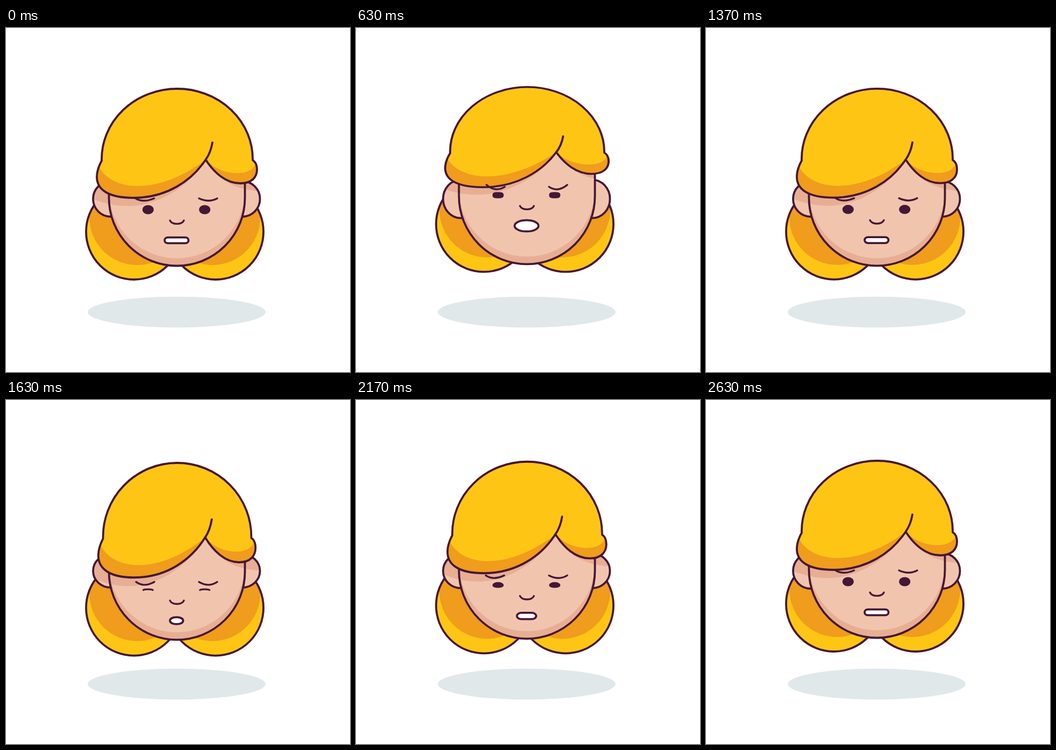
An HTML page for the animation above (4.81 s loop, 640x640 px).

```html
<!DOCTYPE html>
<html lang="en">
<head>
<meta charset="utf-8">
<title>Breathing girl</title>
<style>
  html, body { margin: 0; width: 100%; height: 100%; overflow: hidden; background: #fff; }
  svg { display: block; width: 100vw; height: 100vh; }
  .line { fill: none; stroke: #451736; stroke-width: 3.8; stroke-linecap: round; stroke-linejoin: round; vector-effect: non-scaling-stroke; }
  .thin { stroke-width: 3.4; }
  .hair { fill: #ffc515; }
  .dark { fill: #f09c1c; }
  .skin { fill: #f1c5ad; }
  .tint { fill: #e8ae93; }
  .eye { fill: #451736; stroke-width: 3; }
  .mouth { fill: #fff; }
</style>
</head>
<body>
<svg viewBox="0 0 640 640">
  <defs>
    <path id="face" d="M191.5 200V316A126.5 126.5 0 0 0 444.5 316V200Z"/>
    <ellipse id="earL" cx="195" cy="318" rx="33" ry="33"/>
    <ellipse id="earR" cx="439.5" cy="318" rx="33" ry="33"/>
    <circle id="bunL" cx="238" cy="379" r="89"/>
    <circle id="bunR" cx="390" cy="379" r="89"/>
    <path id="fringeShade" d="M150 230V312C180 329 212 332 235 331C290 328 345 290 372 245C395 284 425 303 485 304V230Z"/>
    <path id="hairShape" d="M178 247A140.5 131 0 0 1 318.5 113A140.5 131 0 0 1 459 246C463 248 467 254 467 263C467 277 458 289 436 289C409 289 387 269 371.5 245C345 285 298 316 237 316C191 316 169 301 169 277C169 265 173 256 178 247Z"/>
    <clipPath id="faceClip"><use href="#face"/></clipPath>
    <clipPath id="earClip"><use href="#earL"/><use href="#earR"/></clipPath>
    <clipPath id="bunLClip"><use href="#bunL"/></clipPath>
    <clipPath id="bunRClip"><use href="#bunR"/></clipPath>
    <clipPath id="hairClip"><use href="#hairShape"/></clipPath>
  </defs>

  <ellipse cx="317.5" cy="528.5" rx="165.5" ry="28.8" fill="#e1e8ea"/>

  <g id="buns">
    <use href="#bunL" class="hair"/>
    <use href="#bunR" class="hair"/>
    <g clip-path="url(#bunLClip)"><circle cx="244" cy="352" r="89" class="dark"/></g>
    <g clip-path="url(#bunRClip)"><circle cx="384" cy="352" r="89" class="dark"/></g>
    <use href="#bunL" class="line"/>
    <use href="#bunR" class="line"/>
  </g>

  <use href="#earL" class="skin"/>
  <use href="#earR" class="skin"/>
  <g clip-path="url(#earClip)"><use href="#fringeShade" class="tint follow"/></g>
  <use href="#earL" class="line"/>
  <use href="#earR" class="line"/>

  <use href="#face" class="tint"/>
  <g clip-path="url(#faceClip)">
    <use href="#face" y="-14" class="skin"/>
    <use href="#fringeShade" class="tint follow"/>
  </g>
  <use href="#face" class="line"/>

  <g class="follow">
    <use href="#hairShape" class="hair"/>
    <g clip-path="url(#hairClip)" class="dark">
      <path d="M160 240L172 256C184 281 212 294 245 294C290 294 336 272 371.5 245V330H160Z"/>
      <path d="M371.5 245C388 263 411 270 430 270C449 270 460 264 466 251H480V300H371.5Z"/>
    </g>
    <use href="#hairShape" class="line"/>
    <path class="line" d="M371.5 245C378 236 382 225 384 213"/>
  </g>

  <path id="browL" class="line thin"/>
  <path id="browR" class="line thin"/>
  <path id="eyeL" class="line eye"/>
  <path id="eyeR" class="line eye"/>
  <path id="nose" class="line thin" d="M305 358C309 366.5 327 366.5 331 358"/>
  <rect id="mouth" class="line mouth"/>
</svg>
<script>
const LOOP = 4810;
// time in ms and vertical travel of the features in px
const KEYS = [[0, 0], [915, -35], [1630, 14.3], [2630, 0], [LOOP, 0]];
const el = id => document.getElementById(id);
const followers = document.querySelectorAll(".follow");

function travel(t) {
  const i = KEYS.findIndex(k => t < k[0]);
  const [t0, a] = KEYS[i - 1], [t1, b] = KEYS[i];
  const p = (t - t0) / (t1 - t0);
  return a + (b - a) * p * p * (3 - 2 * p);
}

function set(id, attrs) {
  for (const name in attrs) el(id).setAttribute(name, attrs[name]);
}

function eyePath(x, y, top, bottom, k) {
  const w = 9, c = w * k;
  return `M${x - w} ${y}` +
    `C${x - w} ${y - top * k} ${x - c} ${y - top} ${x} ${y - top}` +
    `S${x + w} ${y - top * k} ${x + w} ${y}` +
    `C${x + w} ${y + bottom * k} ${x + c} ${y + bottom} ${x} ${y + bottom}` +
    `S${x - w} ${y + bottom * k} ${x - w} ${y}Z`;
}

function draw(t) {
  const d = travel(t);
  const u = Math.max(0, -d / 30);  // breathing in
  const v = Math.max(0, d / 14);   // breathing out
  const mix = (rest, full, empty) => rest + u * full + v * empty;

  set("buns", { transform: `translate(0 ${0.53 * d})` });
  set("face", { transform: `translate(0 ${mix(0, -3.5, 3.5)})` });
  for (const ear of ["earL", "earR"]) set(ear, { ry: mix(33, 3, -2) });

  const sx = mix(1, 0.023, -0.018), sy = mix(1, -0.091, 0.049);
  const hair = `translate(318.5 ${mix(113, -3.5, 4)}) scale(${sx} ${sy}) translate(-318.5 -113)`;
  followers.forEach(f => f.setAttribute("transform", hair));

  const outer = mix(317, -28, 21), inner = mix(317, -24, 21);
  const sag = mix(5.5, 3, 1.5);
  const xl = mix(241, 2, 1), xr = mix(275.5, 1.5, 0.5);
  set("browL", { d: `M${xl} ${outer}C${xl + 9} ${outer + sag} ${xr - 13} ${inner + sag} ${xr} ${inner}` });
  set("browR", { d: `M359 ${inner}C371 ${inner + sag} 383 ${outer + sag} 393 ${outer}` });

  const y = 338 + d + v * 1.3;
  const top = mix(7, -3, -5.5), bottom = mix(7, -3, -8.5);
  const k = Math.min(0.85, 0.5523 + 0.25 * u);
  set("eyeL", { d: eyePath(264.3, y, top, bottom, k) });
  set("eyeR", { d: eyePath(369.7, y, top, bottom, k) });

  set("nose", { transform: `translate(0 ${d + 0.8 * v})` });

  const w = 44.5 - 19.5 * v, h = mix(10.8, 11, 2);
  set("mouth", {
    x: 317.3 - w / 2, y: 395 + d + 1.2 * v - h / 2, width: w, height: h,
    rx: Math.min(w / 2, mix(6, 17, 5)), ry: h / 2
  });
}

const start = performance.now();
function tick() {
  draw((performance.now() - start) % LOOP);
  requestAnimationFrame(tick);
}
tick();
</script>
</body>
</html>
```
